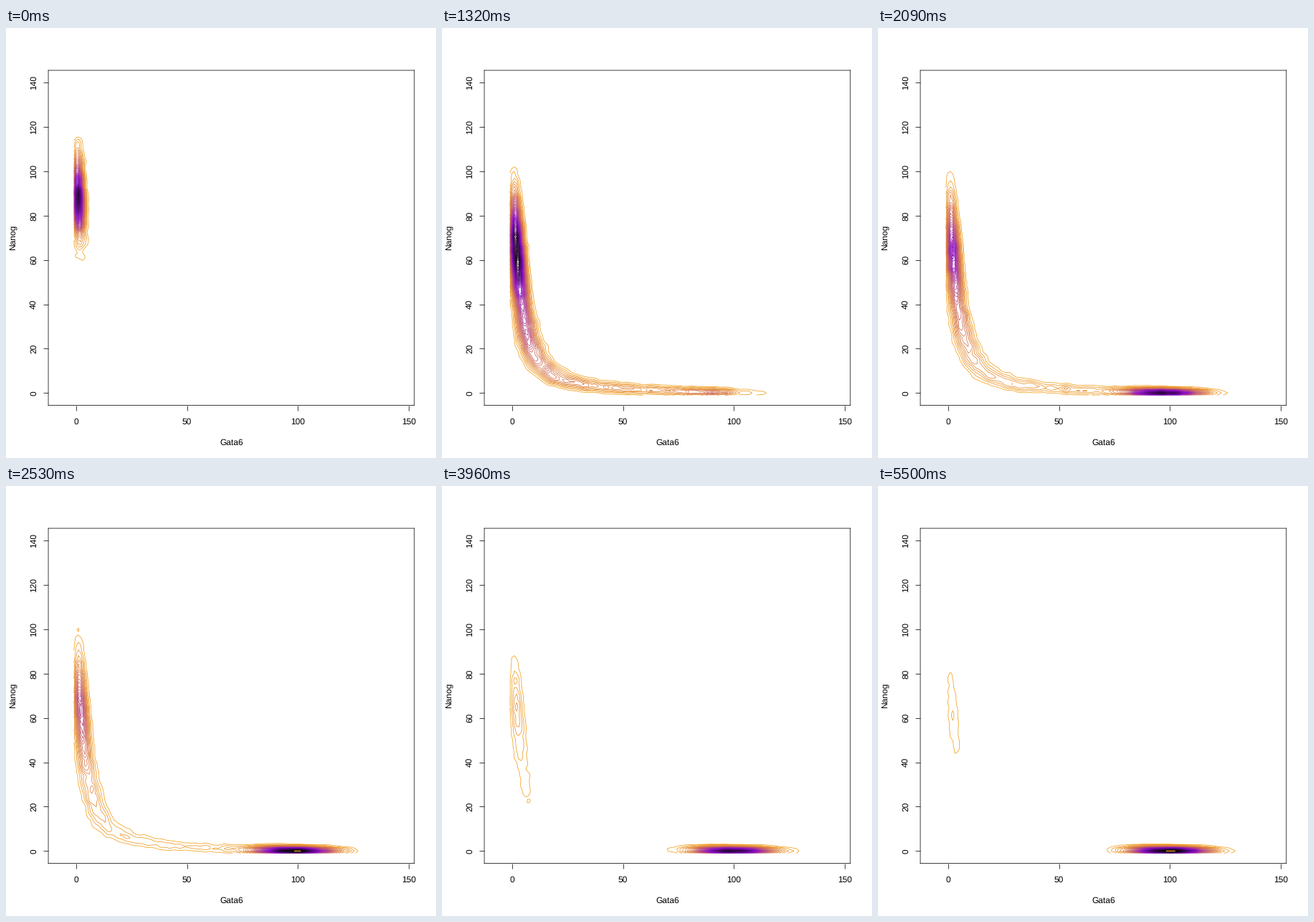
A matplotlib script that plays this animation: 600 px wide and 600 px high, repeating every 5.61 s.

```python
import numpy as np
import matplotlib.pyplot as plt
from matplotlib.animation import FuncAnimation
from matplotlib.colors import LinearSegmentedColormap

FRAMES, INTERVAL = 51, 110
SIZE, PX = 600, 0.72          # stage in pixels, points per pixel at 100 dpi
LINE = 0.75 * PX
H = 1.05                      # smoothing bandwidth in counts

plt.rcParams.update({"font.family": "Liberation Sans", "text.hinting": "none"})
fig = plt.figure(figsize=(6, 6), dpi=100, facecolor="white")
left, right, top, bottom = 59.04, 569.76, 59.04, 526.56
ax = fig.add_axes([left / SIZE, 1 - bottom / SIZE,
                   (right - left) / SIZE, (bottom - top) / SIZE])
scale = (bottom - top) / 151.2
half = (right - left) / scale / 2
ax.set_xlim(70 - half, 70 + half)
ax.set_ylim(-5.6, 145.6)


def label(text, x, y, angle=0):
    fig.text(x / SIZE, 1 - y / SIZE, text, fontsize=12 * PX, rotation=angle,
             rotation_mode="anchor", ha="center", va="baseline")


x_ticks, y_ticks = range(0, 151, 50), range(0, 141, 20)
ax.set_xticks(x_ticks)
ax.set_yticks(y_ticks)
ax.tick_params(length=7.2 * PX, width=LINE, labelbottom=False, labelleft=False)
for spine in ax.spines.values():
    spine.set_linewidth(LINE)
for part in [*ax.spines.values(), *ax.get_xticklines(), *ax.get_yticklines()]:
    part.set_snap(False)
for v in x_ticks:
    label(str(v), left + (v - 70 + half) * scale, 552.8)
for v in y_ticks:
    label(str(v), 42, bottom - (v + 5.6) * scale, 90)
label("Gata6", (left + right) / 2, 582)
label("Nanog", 12.8, (top + bottom) / 2, 90)

ramp = LinearSegmentedColormap.from_list("ramp", ["#f39c12", "#8b0cc8", "black"])
levels = np.arange(1, 54)
level_colors = [ramp((n - 1) % 50 / 49) for n in levels]

# Path that cells follow from the high-Nanog to the high-Gata6 state:
# repression of Nanog by Gata6, fading to zero at Gata6 = 100
mean_x = 145 * np.linspace(0, 1, 600) ** 4
fade = np.clip(1 - (mean_x / 100) ** 4, 0, 1)
mean_y = fade * 90 / (1 + (mean_x / 3.8) ** 1.45) + 40 * np.exp(-2 * mean_x)
step = np.hypot(np.gradient(mean_x), np.gradient(mean_y))

xs, ys = np.arange(-1, 150), np.arange(-1, 136)


def bell(v, mean, sd):
    return np.exp(-((v - mean) / sd) ** 2 / 2)


def spread(grid, mean, sd):
    """One row of probabilities over the counts for each path point."""
    g = bell(grid, mean[:, None], sd[:, None]) * (grid >= 0)
    return g / g.sum(axis=1, keepdims=True)


def kernel(grid):
    return bell(grid[:, None], grid, H) / (H * np.sqrt(2 * np.pi))


spread_x = spread(xs, mean_x, 0.65 * np.sqrt(mean_x) + 0.6)
spread_y = spread(ys, mean_y, 0.55 * np.sqrt(mean_y) + 0.1)
kernel_x, kernel_y = kernel(xs), kernel(ys)


def smooth(z):
    return kernel_y @ z @ kernel_x


def field(weight):
    return spread_y.T @ ((weight * step)[:, None] * spread_x)


def peaked(weight, peak):
    z = field(weight)
    return z * peak / smooth(z).max()


# Cells in transit are slow at the bend and then cross at a steady speed
transit = (11 + 70 * np.exp(-mean_x / 12)) * (1 - np.exp(-(mean_x / 5) ** 4))
transit *= fade * np.sqrt(2 * np.pi)


def density(t):
    settle = np.exp(-t / 3.5)
    waiting = np.exp(-0.063 * max(0, t - 11))
    flux = np.exp(-0.095 * (t - 16)) / (1 + np.exp((10 - t) / 1.5))
    reach = 60 * np.exp(0.42 * (t - 8))
    arrival = 99.8 - 4.8 * np.exp((16 - t) / 6)

    z = peaked(bell(mean_y, 62 + 26 * settle, 13.5 - 5 * settle), 64 * waiting)
    z += field(transit * flux * np.exp(-mean_x / reach))
    z += peaked(bell(mean_x, arrival, 7.6), 165 * (1 - waiting))

    cells = 2000 + 16000 * (1 - settle)
    rng = np.random.default_rng(t + 11)
    z = smooth(rng.poisson(z / z.sum() * cells))
    # the number of contours drifts as the density range changes
    peak = 47.9 + 4 * np.cos(2 * np.pi * (t - 23) / 9)
    return z * peak / z.max()


drawn = []


def update(frame):
    while drawn:
        drawn.pop().remove()
    drawn.append(ax.contour(xs, ys, density(frame), levels=levels,
                            colors=level_colors, linewidths=LINE))
    return drawn


anim = FuncAnimation(fig, update, frames=FRAMES, interval=INTERVAL,
                     repeat=True, repeat_delay=0, blit=False)
plt.show()
```
